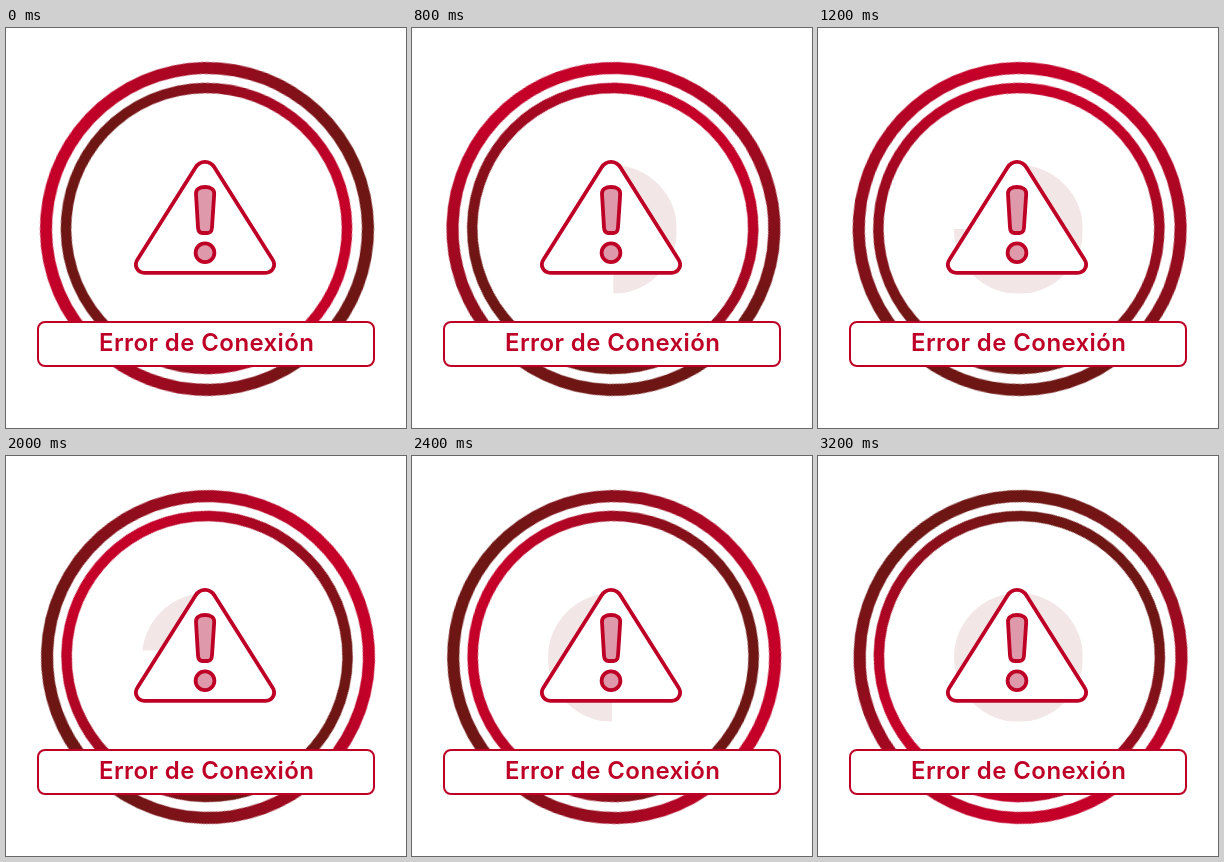
An HTML page that plays this animation: 400 by 400 pixels, repeating every 3.6 s.

```html
<!DOCTYPE html>
<html lang="es">
<head>
<meta charset="utf-8">
<title>Error de Conexión</title>
<style>
  html, body { margin: 0; width: 100%; height: 100%; overflow: hidden; background: #fff; }
  svg { position: absolute; left: 0; top: 0; width: 400px; height: 400px; }

  .disc {
    position: absolute; left: 135.5px; top: 136.5px; width: 129px; height: 129px;
    border-radius: 50%; background: #f3e6e6;
    animation: sweep 3.6s step-end infinite;
  }
  /* fills clockwise, then again counter-clockwise */
  @keyframes sweep {
    0%      { clip-path: polygon(0 0, 0 0, 0 0); }
    11.111% { clip-path: polygon(51% 0, 100% 0, 100% 50%, 51% 50%); }
    22.222% { clip-path: polygon(51% 0, 100% 0, 100% 100%, 51% 100%); }
    33.333% { clip-path: polygon(50% 0, 100% 0, 100% 100%, 0 100%, 0 50%, 50% 50%); }
    44.444% { clip-path: polygon(0 0, 100% 0, 100% 100%, 0 100%); }
    55.555% { clip-path: polygon(0 0, 50% 0, 50% 45%, 0 45%); }
    66.666% { clip-path: polygon(0 0, 50% 0, 50% 100%, 0 100%); }
    77.777% { clip-path: polygon(0 0, 50% 0, 50% 50%, 100% 50%, 100% 100%, 0 100%); }
    88.888% { clip-path: polygon(0 0, 100% 0, 100% 100%, 0 100%); }
  }

  .drift { animation: drift 3.6s steps(9) infinite; }
  .ring { fill: none; stroke: url(#shade); animation: spin 3.6s steps(9) infinite; }
  .outer { --from: 10deg; --to: 280deg; }
  .inner { --from: 190deg; --to: -80deg; }
  @keyframes spin {
    from { transform: rotate(var(--from)); }
    to { transform: rotate(var(--to)); }
  }
  @keyframes drift {
    from { transform: translateX(0); }
    to { transform: translateX(var(--shift)); }
  }

  .line { stroke: #be0027; stroke-width: 3.8; stroke-linejoin: round; }
  text { font: 600 24px Inter, sans-serif; letter-spacing: .4px; fill: #be0027; text-anchor: middle; }
</style>
</head>
<body>
<div class="disc"></div>
<svg viewBox="0 0 400 400">
  <defs>
    <linearGradient id="shade">
      <stop offset=".05" stop-color="#c40029"/>
      <stop offset=".9" stop-color="#6e1614"/>
    </linearGradient>
  </defs>

  <g transform="translate(201 201)">
    <g class="drift" style="--shift: 1.8px">
      <circle class="ring outer" r="161" stroke-width="12"/>
    </g>
  </g>
  <g transform="translate(200.5 200.5)">
    <g class="drift" style="--shift: 1px">
      <circle class="ring inner" r="140.5" stroke-width="10.5"/>
    </g>
  </g>

  <path class="line" fill="#fff" d="M189.5 139.5 C194 132 204 132 208.5 139.5 L266.5 231.5 C270.5 237.5 266.5 244.8 259.5 244.8 H138.5 C131.5 244.8 127.5 237.5 131.5 231.5 Z"/>
  <g class="line" fill="#de9aab">
    <path d="M190 166 C189.7 161.5 193.5 159 199 159 S208.5 161.5 208.2 166 L206 199.5 Q205.6 205 201.5 205 H196.5 Q192.4 205 192 199.5 Z"/>
    <circle cx="199" cy="224.7" r="9.4"/>
  </g>

  <rect x="32" y="294" width="336" height="44" rx="7" fill="#fff" stroke="#be0027" stroke-width="2"/>
  <text x="200.7" y="323">Error de Conexión</text>
</svg>
</body>
</html>
```
